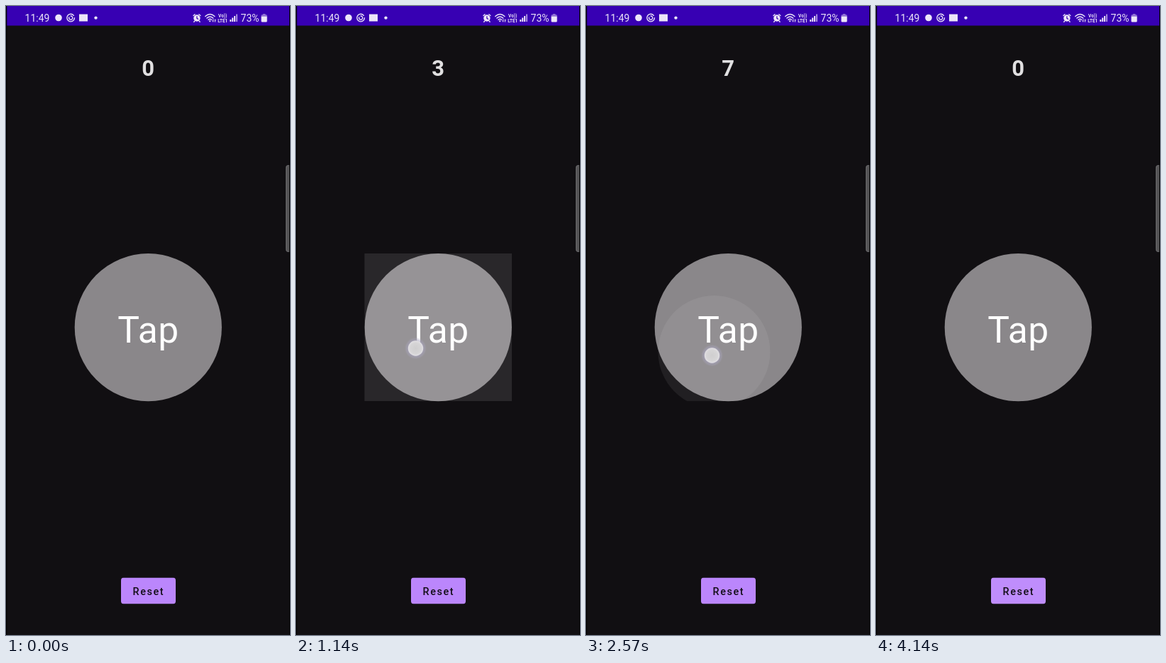
Animation, 400 px wide and 882 px high, one loop 4.28 s. Source, as an HTML page:

```html
<!DOCTYPE html>
<html lang="en">
<head>
<meta charset="utf-8">
<title>Tap counter</title>
<style>
  html, body { margin: 0; width: 100%; height: 100%; overflow: hidden; background: #110f12; }
  svg { display: block; width: 100%; height: 100%; font-family: Roboto, sans-serif; }
  .mid { text-anchor: middle; }
  #status { fill: #ece6f8; font-size: 14px; }
  .line { fill: none; stroke: #ece6f8; stroke-width: 1.4; stroke-linecap: round; }
  .tiny { font-size: 6.4px; font-weight: 700; }
  #count { font-size: 31px; font-weight: 700; letter-spacing: .5px; fill: #e1e0e1; }
  #label { font-size: 51.5px; letter-spacing: .5px; fill: #fff; }
  #reset { font-size: 14.4px; font-weight: 500; letter-spacing: 1.6px; fill: #120d17; }
</style>
</head>
<body>
<svg viewBox="0 0 400 882">
  <defs>
    <clipPath id="pad"><rect x="96.5" y="347" width="207.5" height="207"/></clipPath>
    <clipPath id="key"><rect x="162" y="801.5" width="77" height="37" rx="4"/></clipPath>
    <radialGradient id="dot">
      <stop offset="0" stop-color="#cfcecf"/>
      <stop offset=".7" stop-color="#d6d5d6"/>
      <stop offset="1" stop-color="#e2e0e4"/>
    </radialGradient>
    <radialGradient id="halo">
      <stop offset=".65" stop-color="#aaa6c0" stop-opacity=".75"/>
      <stop offset="1" stop-color="#aaa6c0" stop-opacity=".1"/>
    </radialGradient>
  </defs>

  <rect width="400" height="882" fill="#110f12"/>
  <rect width="400" height="27.5" fill="#3700b3"/>

  <g id="status">
    <text x="26.6" y="21.5">11:49</text>
    <circle cx="74" cy="16.5" r="4.8"/>
    <circle class="line" cx="91.2" cy="16.6" r="5.3" stroke-dasharray="29 4.3"/>
    <path class="line" d="M91.2 14a2.6 2.6 0 1 1-2.4 1.7"/>
    <rect x="103" y="11.5" width="12" height="10"/>
    <circle cx="126.5" cy="16.6" r="2.2"/>

    <circle cx="268.9" cy="17" r="4.7"/>
    <path class="line" d="M264 13.6l2-1.8M273.8 13.6l-2-1.8M265.6 21.2l-.9 1M272.2 21.2l.9 1"/>
    <path d="M268.9 14.3v3l2 1.2" fill="none" stroke="#3700b3" stroke-width="1.2"/>

    <path class="line" d="M280.7 14.6q6.6-6 13.2 0M282.9 17q4.4-3.9 8.8 0M285 19.3q2.3-1.9 4.5 0"/>
    <circle cx="287.2" cy="21.2" r="1.1"/>
    <path class="line" style="stroke-width:1" d="M291.8 18.8v3.4l-1-1M294.4 22.2v-3.4l1 1"/>

    <text class="tiny mid" x="305.2" y="16">Vo))</text>
    <text class="tiny mid" x="305.2" y="22.8">LTE1</text>
    <path d="M315.3 19h2v3h-2zM318.2 16.6h2V22h-2zM321.1 14h2v8h-2z"/>
    <path d="M324 11.4h2V22h-2z" opacity=".6"/>
    <text x="330.6" y="21.5">73%</text>
    <path d="M361.8 11h3.6v1.3h1q1.3 0 1.3 1.3V15h-8.2v-1.4q0-1.3 1.3-1.3h1z" opacity=".5"/>
    <path d="M359.5 14.8h8.2v6.4q0 1.3-1.3 1.3h-5.6q-1.3 0-1.3-1.3z"/>
  </g>

  <path d="M400 223h-2.5q-3.5 0-3.5 4v114q0 4 3.5 4h2.5z" fill="#555456"/>
  <path d="M398 223.5q-3.5 0-3.5 4v113q0 4 3.5 4" fill="none" stroke="#6b6a6c"/>
  <path d="M0 0h1.3v882H0zM399 0h1v882h-1z" fill="#000"/>

  <text id="count" class="mid" x="200.3" y="98">0</text>

  <circle cx="200.3" cy="450.6" r="103.6" fill="#8a878a"/>
  <circle id="ripple" clip-path="url(#pad)" fill="#fff"/>
  <text id="label" class="mid" x="200.5" y="471.6">Tap</text>

  <g clip-path="url(#key)">
    <rect x="162" y="801.5" width="77" height="37" fill="#bb86fc"/>
    <circle id="flash" cx="200.5" cy="820" fill="#fff"/>
  </g>
  <text id="reset" x="178.6" y="826">Reset</text>

  <g id="touch">
    <circle r="15" fill="url(#halo)"/>
    <circle r="10.7" fill="url(#dot)"/>
  </g>
</svg>

<script>
  const LOOP = 4280, RATE = 7;          // the picture is refreshed 7 times a second
  const RESET_STEP = 27;
  // step at which the finger goes down, then where
  const taps = [
    [3, 168, 483], [5, 168, 482], [7, 168.5, 480], [9, 170, 482], [11, 173, 484.5],
    [14, 175, 487], [16, 176, 489], [18, 177.5, 490], [20, 178, 489], [22, 178.5, 488]
  ];
  const $ = id => document.getElementById(id);
  const set = (id, attrs) => {
    for (const k in attrs) $(id).setAttribute(k, attrs[k]);
  };

  const showTouch = (x, y, opacity) =>
    set('touch', { transform: `translate(${x} ${y})`, opacity });

  function showTap(i, age) {
    const [, x, y] = taps[i];
    const pull = .13;
    set('ripple', {
      cx: x + (200.3 - x) * pull,
      cy: y + (450.6 - y) * pull,
      r: age ? 300 : 72 + i,
      opacity: age ? .1 : .065
    });
    const released = i < 3 ? 1 : i < 6 ? .5 : .3;
    showTouch(x, y, age ? released : 1);
  }

  function draw(step) {
    set('ripple', { opacity: 0 });
    set('touch', { opacity: 0 });
    set('flash', { opacity: 0 });

    let count = taps.filter(([s]) => s < step).length;
    const i = taps.findIndex(([s]) => s === step || s + 1 === step);
    if (i >= 0) showTap(i, step - taps[i][0]);

    const age = step - RESET_STEP;
    if (age >= 0) {
      set('flash', { r: age ? 60 : 28, opacity: [.2, .18, .06][age] });
      if (age < 2) showTouch(202, 822, age ? .5 : 1);
      if (age > 0) count = 0;
    }
    $('count').textContent = count;
  }

  let last = -1;
  function tick(now) {
    const step = Math.floor((now % LOOP + 5) * RATE / 1000);
    if (step !== last) draw(Math.min(last = step, 29));
    requestAnimationFrame(tick);
  }
  draw(0);
  requestAnimationFrame(tick);
</script>
</body>
</html>
```
